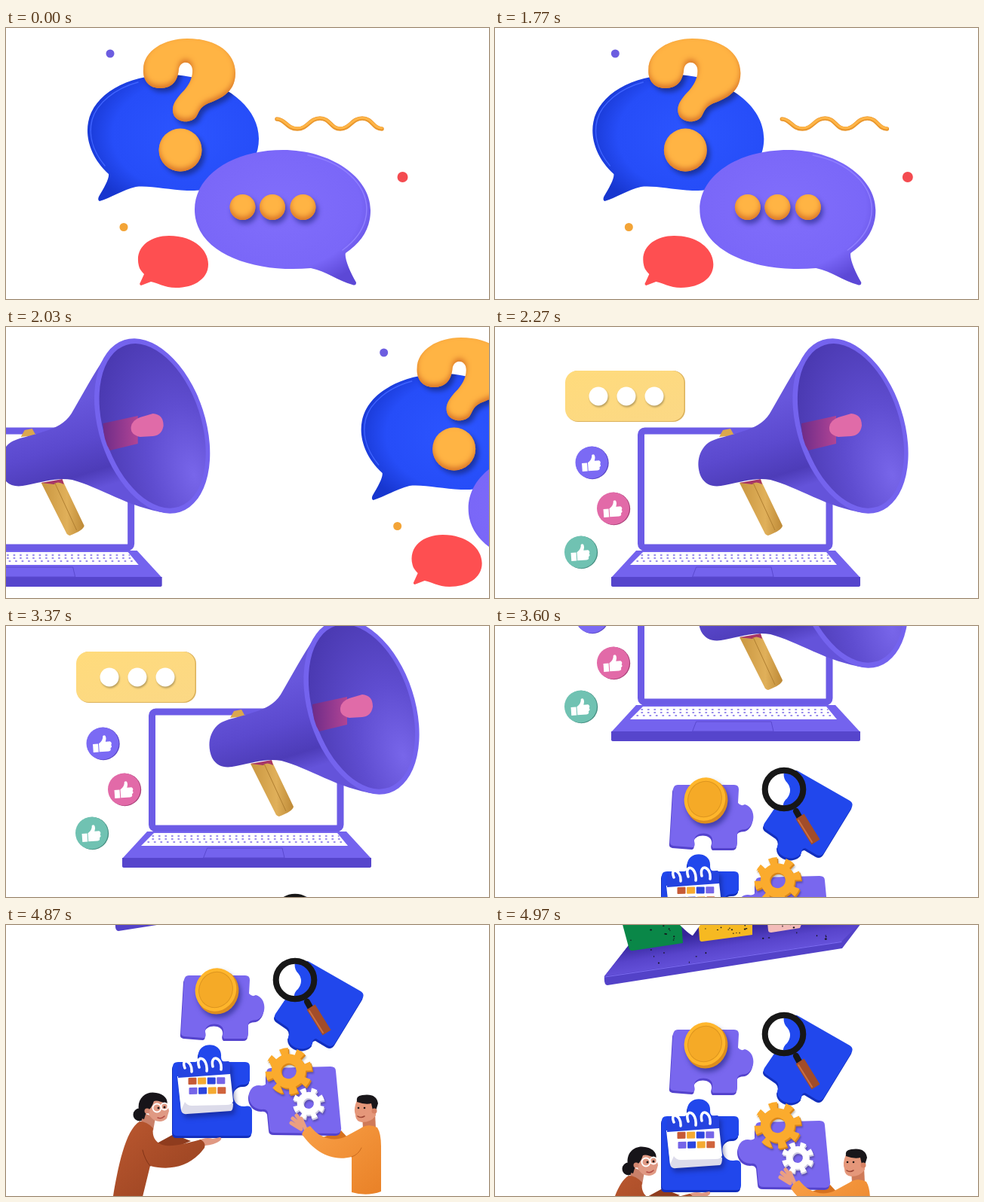
An HTML page for the animation above (5 s loop, 640 by 360 pixels).

```html
<!DOCTYPE html>
<html lang="en">
<head>
<meta charset="utf-8">
<title>Sliding scenes</title>
<style>
html, body { margin: 0; width: 100%; height: 100%; overflow: hidden; background: #fff; }
svg { display: block; width: 100%; height: 100%; }
.line { fill: none; stroke-linecap: round; stroke-linejoin: round; }
.violet { fill: #7967ee; filter: drop-shadow(-1px 3px 0 #5443cd); }
.blue { fill: #2147ec; filter: drop-shadow(-1px 3px 0 #122fbd); }
.cast { filter: drop-shadow(3px 5px 3px #10186a80); }
.soft { filter: drop-shadow(1px 2px 1px #0004); }
.shadow { filter: brightness(0) blur(3px); opacity: .35; }
</style>
</head>
<body>
<svg viewBox="0 0 640 360" preserveAspectRatio="none">
<defs>
  <!-- darkens the lower inside edge so flat shapes look inflated -->
  <filter id="puff" color-interpolation-filters="sRGB">
    <feOffset in="SourceAlpha" dy="-4"/>
    <feGaussianBlur stdDeviation="3.500" result="lit"/>
    <feFlood flood-color="#d87427"/>
    <feComposite in2="SourceAlpha" operator="in"/>
    <feComposite in2="lit" operator="out" result="shade"/>
    <feMerge><feMergeNode in="SourceGraphic"/><feMergeNode in="shade"/></feMerge>
  </filter>
  <radialGradient id="blueBubble" cx=".58" cy=".48" r=".62">
    <stop offset="0" stop-color="#2c55ff"/><stop offset=".7" stop-color="#264df8"/><stop offset="1" stop-color="#1736cf"/>
  </radialGradient>
  <radialGradient id="violetBubble" cx=".48" cy=".42" r=".62">
    <stop offset="0" stop-color="#816efb"/><stop offset=".75" stop-color="#7a67f8"/><stop offset="1" stop-color="#5c48d6"/>
  </radialGradient>
  <linearGradient id="card" x2="1" y2="1">
    <stop offset="0" stop-color="#ffdb7c"/><stop offset="1" stop-color="#fbd885"/>
  </linearGradient>
  <linearGradient id="cone" gradientUnits="userSpaceOnUse" x1="330" y1="110" x2="365" y2="225">
    <stop offset="0" stop-color="#6857dc"/><stop offset=".45" stop-color="#5b49ce"/><stop offset=".8" stop-color="#4d3cb8"/><stop offset="1" stop-color="#6453da"/>
  </linearGradient>
  <radialGradient id="bell" cx=".75" cy=".85" r=".95">
    <stop offset="0" stop-color="#7866ea"/><stop offset=".45" stop-color="#5f4dd0"/><stop offset="1" stop-color="#4938af"/>
  </radialGradient>
  <linearGradient id="rod" x2="1">
    <stop offset="0" stop-color="#6f2c88"/><stop offset="1" stop-color="#b04495"/>
  </linearGradient>
  <linearGradient id="grip" x2="1">
    <stop offset="0" stop-color="#c99640"/><stop offset=".6" stop-color="#e0b05a"/><stop offset="1" stop-color="#bd8936"/>
  </linearGradient>
  <linearGradient id="rust" x2="1" y2="1">
    <stop offset="0" stop-color="#bb5830"/><stop offset="1" stop-color="#95401f"/>
  </linearGradient>
  <linearGradient id="amber" x2="1" y2="1">
    <stop offset="0" stop-color="#f9a047"/><stop offset="1" stop-color="#e98127"/>
  </linearGradient>
  <linearGradient id="board" gradientUnits="userSpaceOnUse" x1="300" y1="270" x2="307" y2="315">
    <stop offset="0" stop-color="#35259a"/><stop offset=".5" stop-color="#5844cb"/><stop offset="1" stop-color="#6855de"/>
  </linearGradient>
  <clipPath id="lens"><circle cx="383" cy="49" r="25"/></clipPath>
  <clipPath id="onBlue"><use href="#bubble"/></clipPath>
</defs>

<g id="chat">
  <circle cx="138" cy="34" r="5.5" fill="#6c5de0"/>
  <path id="bubble" fill="url(#blueBubble)" d="M136 194C112 172 105 145 109 125C116 88 160 63 215 62C275 62 335 98 335 147C335 190 295 217 240 216C215 215 190 209 172 211C155 215 138 226 124 230Q121 229 123 224C130 212 137 200 136 194Z"/>
  <path class="line" stroke="#3f63ff" stroke-width="1.5" d="M131 183C112 160 110 138 114 122C120 100 145 80 175 72"/>
  <g clip-path="url(#onBlue)"><use href="#mark" class="shadow" x="4" y="5"/></g>
  <g id="mark" fill="#ffb444" filter="url(#puff)">
    <path d="M182 55C182 30 210 14 240 14C278 14 304 32 304 60C304 88 280 95 266 101C256 106 256 112 252 118C246 126 230 127 223 117C217 105 225 95 233 86C242 77 248 66 247 55C246 44 232 42 229 54C228 68 222 80 204 80C190 80 181 70 182 55Z"/>
    <circle cx="231" cy="162" r="28.5"/>
  </g>
  <path class="line" stroke="#e9962c" stroke-width="5.5" d="M359 121C370 121 372 134 386 134S402 120 416 120S430 134 443 134S458 120 472 120S486 134 498 134"/>
  <path class="line" stroke="#ffb547" stroke-width="3" d="M359 120.500C370 120.500 372 133 386 133S402 119.500 416 119.500S430 133 443 133S458 119.500 472 119.500S486 133 498 133"/>
  <circle cx="525.5" cy="198" r="7" fill="#f44b50"/>
  <path fill="url(#violetBubble)" d="M367 162C430 162 483 198 483 242C483 268 470 285 450 299C448 305 456 325 464 338Q464 343 459 341C440 336 425 323 404 319C330 326 250 300 250 241C250 196 300 162 367 162Z"/>
  <path class="line" stroke="#8f7eff" stroke-width="1.5" d="M400 169C445 178 477 206 478 240C478 263 465 281 446 295"/>
  <g class="cast"><g fill="#ffb444" filter="url(#puff)">
    <circle cx="313.500" cy="238" r="17"/><circle cx="353" cy="238" r="17"/><circle cx="393.500" cy="238" r="17"/>
  </g></g>
  <circle cx="156" cy="264.500" r="5.500" fill="#f3a437"/>
  <path fill="#fe4f51" d="M176 316C170 292 190 276 216 276C248 276 268 294 268 314C268 334 248 345 225 345C210 345 200 338 192 337L179 342Q176 341 178 338L183 327Q177 321 176 316Z"/>
</g>

<g id="promo">
  <rect x="94" y="58" width="158" height="68" rx="16" fill="#dcb25c"/>
  <rect x="93" y="58" width="157.500" height="67" rx="16" fill="url(#card)"/>
  <g class="soft" fill="#fff">
    <circle cx="137" cy="92" r="12.500"/><circle cx="174" cy="92" r="12.500"/><circle cx="211" cy="92" r="12.500"/>
  </g>
  <g id="likes"></g>
  <rect x="193.500" y="138" width="249.500" height="155" rx="5" fill="#fff" stroke="#6c5be6" stroke-width="9"/>
  <path fill="#7463ee" d="M187 297H451L484 333H154Z"/>
  <path fill="#5645cc" d="M154 332H484V343Q484 345 481 345H157Q154 345 154 343Z"/>
  <path fill="#fff" d="M196 299H439L453 316H179Z"/>
  <g class="line" stroke="#7766e6" stroke-width="1.500">
    <path stroke-dasharray="1.500 7" d="M194 303H441M194 307H445M188 311H449"/>
    <path stroke="#5a49cf" stroke-width="1" d="M267 319H366L369 332H262Z"/>
  </g>
  <path fill="#dba74d" d="M297 146L302 137L312 135L317 144Z"/>
  <path fill="url(#grip)" d="M324 207L352 203L381 264Q380 270 362 277Q358 276 357 273Z"/>
  <path fill="#a73568" d="M324 207L352 202L354 209Q345 204 341 209Z"/>
  <path fill="none" stroke="#b07f31" d="M342 207L371 270"/>
  <path fill="url(#cone)" d="M446 16C424 18 412 34 402 50C388 72 375 96 364 115C356 128 342 134 330 138C305 147 290 147 280 156C268 168 267 185 273 199C280 212 292 213 305 210C330 205 345 200 365 203C400 212 440 240 490 247Z"/>
  <g transform="rotate(-18 471 131.500)">
    <ellipse cx="471" cy="131.500" rx="70.500" ry="120" fill="#7463ee"/>
    <ellipse cx="471.500" cy="131.500" rx="64.500" ry="113" fill="url(#bell)"/>
  </g>
  <path fill="url(#rod)" d="M406 128L452 118V155L415 164Q406 150 406 128Z"/>
  <path fill="#e06ba8" d="M455 120L472 115Q486 116 486 131Q484 144 472 145L455 146Q442 143 443 133Q444 124 455 120Z"/>
</g>

<g id="team">
  <!-- coin -->
  <path class="violet" d="M242 43H317Q323 43 323 49L322 67Q326 72 331 69C346 73 346 97 332 102Q321 102 321 109V121Q321 127 315 127H289Q286 125 288 118C290 104 263 104 264 118Q266 125 262 126L236 124Q231 123 232 118L236 49Q237 43 242 43Z"/>
  <g class="cast">
    <ellipse cx="280.500" cy="65" rx="27.500" ry="30" fill="#dd8e1e" transform="rotate(25 280.500 65)"/>
    <g transform="rotate(25 278 62)">
      <ellipse cx="278" cy="62" rx="27" ry="29" fill="#ffb62c"/>
      <ellipse cx="278" cy="62" rx="22" ry="24" fill="#f5aa27" stroke="#dd951f"/>
    </g>
  </g>
  <!-- magnifier -->
  <path class="blue" d="M402 25L470 64Q476 68 472 74L436 133Q432 139 426 136L411 127Q406 127 406 134C399 145 374 142 374 125Q378 117 373 112L360 103Q354 99 357 94L374 69Q378 66 383 72C396 70 394 45 384 44Q382 41 385 36L393 26Q397 22 402 25Z"/>
  <g clip-path="url(#lens)">
    <path fill="#fff" d="M355 20H412V80H355Z"/>
    <path fill="#2149ef" d="M384 20Q380 33 387 40Q395 50 387 61Q379 67 383 80H420V20Z"/>
  </g>
  <g class="line">
    <circle cx="383" cy="49" r="25.300" stroke="#171717" stroke-width="8"/>
    <path stroke="#171717" stroke-width="8" d="M399 78L404 87"/>
    <path stroke="#a24c29" stroke-width="13" stroke-linecap="butt" d="M404 85L425 119"/>
    <path stroke="#ca7045" stroke-width="2" d="M402 90L420 119"/>
  </g>
  <!-- arms behind the tiles -->
  <path fill="#8f3c1e" d="M200 266L222 254L245 263L215 275Z"/>
  <path fill="#d6721f" d="M420 258L444 249L456 262L430 270Z"/>
  <!-- calendar tile -->
  <path class="blue" d="M228 158H251Q256 157 255 151C253 130 287 130 285 151Q285 157 290 158H317Q323 158 323 164V183Q321 188 315 188C297 187 296 218 316 217Q325 215 326 222V250Q326 256 320 256H227Q221 256 221 250V164Q221 158 228 158Z"/>
  <g class="cast">
    <path fill="#dcdbea" d="M228 178L232 222Q233 228 240 227L298 223Q301 222 301 213Z"/>
    <path fill="#fff" d="M227 177L297 173L301 210Q300 215 292 215L246 216Q240 216 237 211L232 222Z"/>
    <path fill="#2543e0" d="M228 164Q227 161 231 161L294 157Q297 157 297 161V174L228 179Z"/>
  </g>
  <path class="line" stroke="#fff" stroke-width="3.500" d="M237 166C231 152 247 155 246 171M256 165C250 147 268 151 266 170M274 164C270 147 287 151 285 168"/>
  <g id="days" transform="translate(241.500 179) skewY(-1)"></g>
  <!-- gears tile -->
  <path class="violet" d="M351 166L430 164Q437 164 437 170L444 245Q445 252 438 253L356 252Q349 252 349 246L347 225Q345 220 339 221C317 220 317 189 335 189Q345 191 345 184V173Q345 166 351 166Z"/>
  <g id="gears" class="soft"></g>
  <!-- woman -->
  <circle cx="177" cy="228" r="8.500" fill="#171419"/>
  <path fill="#c98069" d="M183 226L198 232L195 249L177 243Z"/>
  <path fill="#e09983" d="M187 206Q205 199 213 210L216 223L213 233Q206 240 196 235Q184 227 187 206Z"/>
  <path fill="#171419" d="M176 222C173 205 187 196 199 199C212 201 215 210 213 214Q201 208 196 210Q193 220 186 224L183 234Q175 232 176 222Z"/>
  <circle cx="187" cy="223" r="3.500" fill="#d3866f"/>
  <g fill="none" stroke="#fff" stroke-width="1.800"><circle cx="200" cy="219" r="5.500"/><circle cx="210" cy="217" r="4.500"/></g>
  <g fill="#231818"><circle cx="202" cy="219" r="1.500"/><circle cx="210" cy="218" r="1.500"/></g>
  <path class="line" stroke="#b34a43" stroke-width="1.500" d="M201 232Q206 234 210 230"/>
  <path fill="#e09983" d="M254 263Q264 257 274 260L284 258Q287 260 283 263Q276 268 264 269L257 273Z"/>
  <path fill="url(#rust)" d="M177 237Q187 237 195 246C193 258 199 265 207 268C220 272 238 266 258 261Q265 265 263 272C245 297 218 303 191 296L181 337Q160 343 142 336C148 300 158 248 177 237Z"/>
  <path class="line" stroke="#813317" d="M191 296Q184 288 181 275"/>
  <!-- man -->
  <path fill="#cf7a58" d="M472 229L489 226L490 246L473 246Z"/>
  <path fill="#e5977a" d="M465 209Q481 202 490 212V229Q484 238 472 238Q463 237 463 228Q460 221 465 209Z"/>
  <path fill="#19161a" d="M465 211Q463 203 472 202Q491 199 493 213L490 223L486 222L484 213Q476 215 465 211Z"/>
  <circle cx="488" cy="223" r="3.500" fill="#d68163"/>
  <g fill="#231818"><circle cx="467" cy="219" r="1.300"/><circle cx="475" cy="219" r="1.300"/></g>
  <path class="line" stroke="#9c4635" stroke-width="1.500" d="M466 230Q470 233 475 230"/>
  <path class="line" stroke="#eb9f80" stroke-width="5" d="M391 247L378 239M392 243L380 233M395 242L385 229M397 247L391 233"/>
  <path fill="url(#amber)" d="M470 246Q480 239 492 245Q497 253 497 270V330Q478 337 458 331V284C430 291 408 276 392 254Q395 246 403 243C415 259 433 264 448 258Z"/>
  <path class="line" stroke="#c96a1e" d="M458 284Q467 281 471 272"/>
</g>

<g id="shelf">
  <path fill="#5342c8" d="M145 332L177 291L182 255H500L485 262L460 295L149 344Q144 344 145 332Z"/>
  <path fill="url(#board)" d="M145 332L177 291L182 240H500L481 264L459 286Z"/>
  <path class="line" stroke="#7d6cf2" d="M146 333L459 286.500"/>
  <path fill="#0a8748" d="M160 230H245L249 288L183 298Q178 299 177 293Z"/>
  <path fill="#f6b922" d="M267 230H341V277L274 286Q271 286 271 282Z"/>
  <path fill="#f3bcb9" d="M358 230H420L404 268L366 274Q362 274 362 271Z"/>
  <path fill="#fff" d="M238 250H282L262 278Q258 277 245 264Z"/>
  <g id="specks" fill="#15131c"></g>
</g>
</svg>
<script>
const el = id => document.getElementById(id);
const clamp = v => Math.min(1, Math.max(0, v));

el('likes').innerHTML = [[128, 180, '#7b6af4', '#5946c4'], [156.5, 241, '#e26aa8', '#a84078'], [113.5, 299, '#70c2b2', '#458d80']]
  .map(([x, y, fill, edge]) => `<g transform="translate(${x} ${y})">
    <circle cx="1" cy=".5" r="21.700" fill="${edge}"/><circle r="21.500" fill="${fill}"/>
    <path fill="#fff" transform="rotate(-4)" d="M-13 0H-6V11H-13ZM-5 0Q1 -4 1 -10Q5 -12 5 -6L4 -2H10Q13 0 11 3Q13 5 10 7Q11 11 7 11H-5Z"/></g>`).join('');

el('days').innerHTML = ['#c65a36', '#f5aa31', '#2c45df', '#7565e8', '#7565e8', '#2c45df', '#f5aa31', '#d0643c']
  .map((c, i) => `<rect x="${i % 4 * 12.6 + (i > 3 ? 1 : 0)}" y="${i > 3 ? 13 : 0}" width="11" height="9" rx="1" fill="${c}"/>`).join('');

// Eight dashes around a ring form the teeth.
const gear = (x, y, r, turn, color) => `<g fill="none" stroke="${color}" transform="translate(${x} ${y}) rotate(${turn})">
  <circle r="${r * .53}" stroke-width="${r * .4}"/>
  <circle r="${r * .84}" stroke-width="${r * .32}" pathLength="16" stroke-dasharray="1"/></g>`;
el('gears').innerHTML = gear(376, 172, 31, 21, '#d98519') + gear(374.5, 170, 31, 21, '#fbab2d')
  + gear(402, 215, 21, 11, '#c9c6de') + gear(401, 213, 21, 11, '#fff');

let seed = 7;
const rand = () => (seed = seed * 16807 % 2147483647) / 2147483647;
const specks = (x, y, w, h, count) => Array.from({ length: count }, () =>
  `<ellipse cx="${x + rand() * w}" cy="${y + rand() * h}" rx="${.5 + rand()}" ry="${.5 + rand() * .7}"/>`).join('');
el('specks').innerHTML = specks(180, 264, 62, 22, 10) + specks(274, 264, 63, 12, 12)
  + specks(365, 262, 35, 6, 4) + specks(200, 297, 90, 18, 7) + specks(350, 274, 100, 10, 7);

function place(id, x, y) {
  el(id).setAttribute('transform', `translate(${x} ${y})`);
}

function draw() {
  const tick = Math.floor((performance.now() % 5000 + 4) * .03) % 150;  // 30 steps a second
  const right = clamp((tick - 52.5) / 15);
  const up = clamp((tick - 100) / 15);
  const down = clamp((tick - 145) / 15);
  place('chat', 640 * right, 0);
  place('promo', 640 * (right - 1), -360 * up);
  place('team', 0, 360 * (1 - up + down));
  place('shelf', 0, 360 * (down - 1));
  requestAnimationFrame(draw);
}
draw();
</script>
</body>
</html>
```
